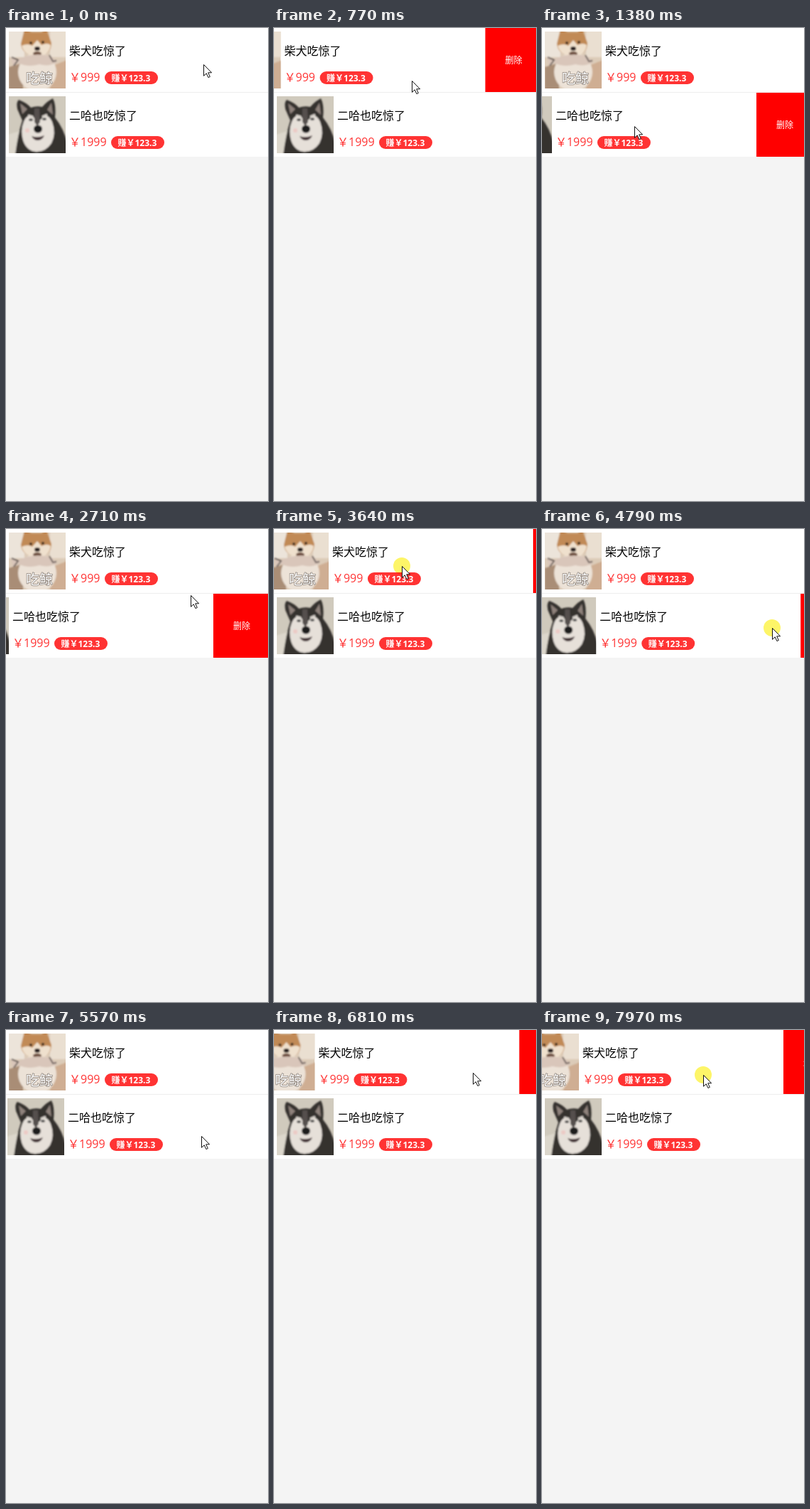
These frames come from a looping animation (369 px wide and 665 px high, 8000 ms). An HTML page:

```html
<!DOCTYPE html>
<html lang="zh">
<head>
<meta charset="utf-8">
<title>滑动删除</title>
<style>
  html, body { margin: 0; width: 100%; height: 100%; overflow: hidden; background: #f4f4f4; }
  svg { display: block; width: 369px; height: 665px; }
  text { font-family: "Open Sans", "Noto Sans CJK SC", "Noto Sans CJK", sans-serif; }
  .title { font-size: 16px; fill: #000; }
  .price { font-size: 16px; fill: #f33; }
  .gain { font-size: 12px; font-weight: 700; fill: #fff; }
  .del { font-size: 12px; fill: #fff; }
  .caption { font-size: 19px; fill: #fff; stroke: #8a8078; stroke-width: 1.4px; paint-order: stroke; }
  #press { fill: #fdf568; mix-blend-mode: multiply; }
</style>
</head>
<body>
<svg viewBox="0 0 369 665">
  <defs>
    <clipPath id="thumb"><rect width="80" height="80"/></clipPath>
    <filter id="soft"><feGaussianBlur stdDeviation="1"/></filter>

    <g id="shiba" clip-path="url(#thumb)">
      <rect width="80" height="80" fill="#dccbb8"/>
      <g filter="url(#soft)">
        <path d="M-2-2H22V36H-2Z" fill="#ece4da"/>
        <path d="M58-2H82V36H58Z" fill="#eadfd1"/>
        <path d="M0 50L20 44V82H0Z" fill="#a98d76"/>
        <path d="M62 48L82 40V82H58Z" fill="#cfae93"/>
        <ellipse cx="40" cy="57" rx="27" ry="27" fill="#ece2d7"/>
        <path d="M17 17L22-3 32 1H46L53-3 60 16Q60 33 40 34Q18 33 17 17Z" fill="#c18a56"/>
        <path d="M18 20Q27 16 33 20L40 12 46 19Q54 15 59 19Q57 34 40 35Q22 34 18 20Z" fill="#efe0cd"/>
        <circle cx="31" cy="16" r="2" fill="#35261c"/>
        <circle cx="48" cy="15" r="2" fill="#35261c"/>
        <ellipse cx="40" cy="24" rx="4" ry="3" fill="#2c2220"/>
        <ellipse cx="40" cy="31" rx="6" ry="3" fill="#6b4a3a"/>
        <path d="M3 36L13 39Q36 28 60 35L68 43Q56 50 43 46Q27 51 13 44L6 48Z" fill="#d9c6ba"/>
        <path d="M4 36L13 40 7 48M57 33L62 42 67 41" stroke="#6c615c" stroke-width="2" fill="none"/>
      </g>
      <text class="caption" x="24" y="72.5">吃鲸</text>
    </g>

    <g id="husky" clip-path="url(#thumb)">
      <rect width="80" height="80" fill="#d0cabd"/>
      <g filter="url(#soft)">
        <path d="M-2 54L18 48 10 82H-2Z" fill="#dcd7cc"/>
        <path d="M9 82Q13 52 19 34L12 18Q10 8 14 5Q25 9 31 16Q39 13 47 15Q55 6 62 3Q67 12 65 30Q78 46 82 66V82Z" fill="#34302f"/>
        <path d="M16 10L26 18 19 25ZM60 9L62 26 54 19Z" fill="#8f827b"/>
        <path d="M21 36Q25 25 34 28L38 34 45 33 49 27Q57 26 61 36Q67 52 60 66Q52 78 39 78Q25 77 20 62Q16 48 21 36Z" fill="#e6e0d9"/>
        <path d="M36 17H43L44 36 40 42 36 36Z" fill="#54504e"/>
        <path d="M27 27L34 29M47 29L54 26" stroke="#d9d3cc" stroke-width="3"/>
        <ellipse cx="31" cy="33" rx="3" ry="1.8" fill="#444"/>
        <ellipse cx="50" cy="32" rx="3" ry="1.8" fill="#444"/>
        <ellipse cx="41" cy="46" rx="6" ry="5.5" fill="#1c1a1c"/>
        <path d="M32 56Q41 59 50 55Q47 62 41 62Q35 62 32 56Z" fill="#453638"/>
        <circle cx="26" cy="48" r="3" fill="#ecc9c5"/>
      </g>
    </g>
  </defs>

  <rect width="369" height="181" fill="#fff"/>
  <rect y="90" width="369" height="1" fill="#eee"/>
  <g id="list"></g>
  <g id="pointer">
    <circle id="press" r="12"/>
    <path d="M.5 .5V16.3L4.2 12.8 6.9 18.6 9.3 17.5 6.7 11.8H11.6Z" fill="#fff" stroke="#111"/>
  </g>
</svg>
<script>
const LOOP = 8000, TICK = 77.3, LEAD = 12;   // ms
const OPEN = -80, THRESHOLD = -50;           // px
const SETTLE = 5.4;                          // ticks a released row needs to come to rest
const $ = id => document.getElementById(id);

function addRow(y, pic, title, price, pillX) {
  const row = document.createElementNS('http://www.w3.org/2000/svg', 'g');
  row.innerHTML = `
    <use href="#${pic}" x="4" y="5"/>
    <text class="title" x="89" y="38">${title}</text>
    <text class="price" x="89" y="75">￥${price}</text>
    <rect x="${pillX}" y="61" width="75" height="18" rx="9" fill="#f33"/>
    <text class="gain" x="${pillX + 9.5}" y="74.5">赚￥123.3</text>
    <rect x="372" width="80" height="90" fill="#f00"/>
    <text class="del" x="400" y="50">删除</text>`;
  $('list').append(row);
  return shift => row.setAttribute('transform', `translate(${shift} ${y})`);
}

const rows = [
  addRow(0, 'shiba', '柴犬吃惊了', '999', 139),
  addRow(91, 'husky', '二哈也吃惊了', '1999', 148)
];

// Pointer script, times in ticks
const swipe = (row, start, end, x0, x1, y) => ({ row, start, end, x0, x1, y, down: true });
const tap = (start, x, y) => ({ start, end: start + 1, x0: x, x1: x, y, down: true });
const hover = (start, end, x, y) => ({ start, end, x0: x, x1: x, y });

const moves = [
  hover(0, 1, 278, 51),
  swipe(0, 3, 8, 260, 194, 52),
  swipe(1, 12, 17, 195, 130, 138),
  hover(24, 25, 322, 126),
  hover(27, 28, 329, 132),
  tap(39, 222, 72),
  swipe(0, 46, 51, 187, 119, 52),
  tap(56, 332, 139),
  swipe(1, 59, 68, 332, 302, 139),
  hover(72, 73, 275, 149),
  swipe(0, 77, 79, 310, 280, 62),
  swipe(0, 85, 87, 320, 280, 60),
  swipe(0, 97, 103, 259, 227, 63)
];

const clamp = p => Math.min(1, Math.max(0, p));
const smooth = p => (p = clamp(p), p * p * (3 - 2 * p));
const easeOut = p => 1 - (1 - clamp(p)) ** 2;
const mix = (a, b, p) => a + (b - a) * p;
const progress = (m, t) => smooth((t - m.start) / (m.end - m.start));

// A row follows its drag, then snaps open or shut; a press elsewhere shuts it
function shiftOf(row, t) {
  let from = 0, to = 0, since = 0;
  for (const m of moves) {
    if (t < m.start) break;
    if (!m.down) continue;
    if (m.row === row) {
      const drag = m.x1 - m.x0;
      if (t < m.end) return drag * progress(m, t);
      from = drag;
      to = drag < THRESHOLD ? OPEN : 0;
      since = m.end;
    } else if (to) {
      from = to;
      to = 0;
      since = m.start;
    }
  }
  return mix(from, to, easeOut((t - since) / SETTLE));
}

function pointerAt(t) {
  const i = moves.findLastIndex(m => m.start <= t);
  const m = moves[i], next = moves[i + 1];
  if (t <= m.end || !next) return { x: mix(m.x0, m.x1, progress(m, t)), y: m.y, down: m.down };
  const rest = m.end + 1;
  const p = smooth((t - rest) / (next.start - rest));
  return { x: mix(m.x1, next.x0, p), y: mix(m.y, next.y, p) };
}

function draw(ms) {
  const t = Math.floor((ms % LOOP + LEAD) / TICK);
  rows.forEach((place, i) => place(shiftOf(i, t)));
  const { x, y, down } = pointerAt(t);
  $('pointer').setAttribute('transform', `translate(${Math.round(x)} ${Math.round(y)})`);
  $('press').setAttribute('visibility', down ? 'visible' : 'hidden');
}

const start = performance.now();
function loop() {
  draw(performance.now() - start);
  requestAnimationFrame(loop);
}
loop();
</script>
</body>
</html>
```
